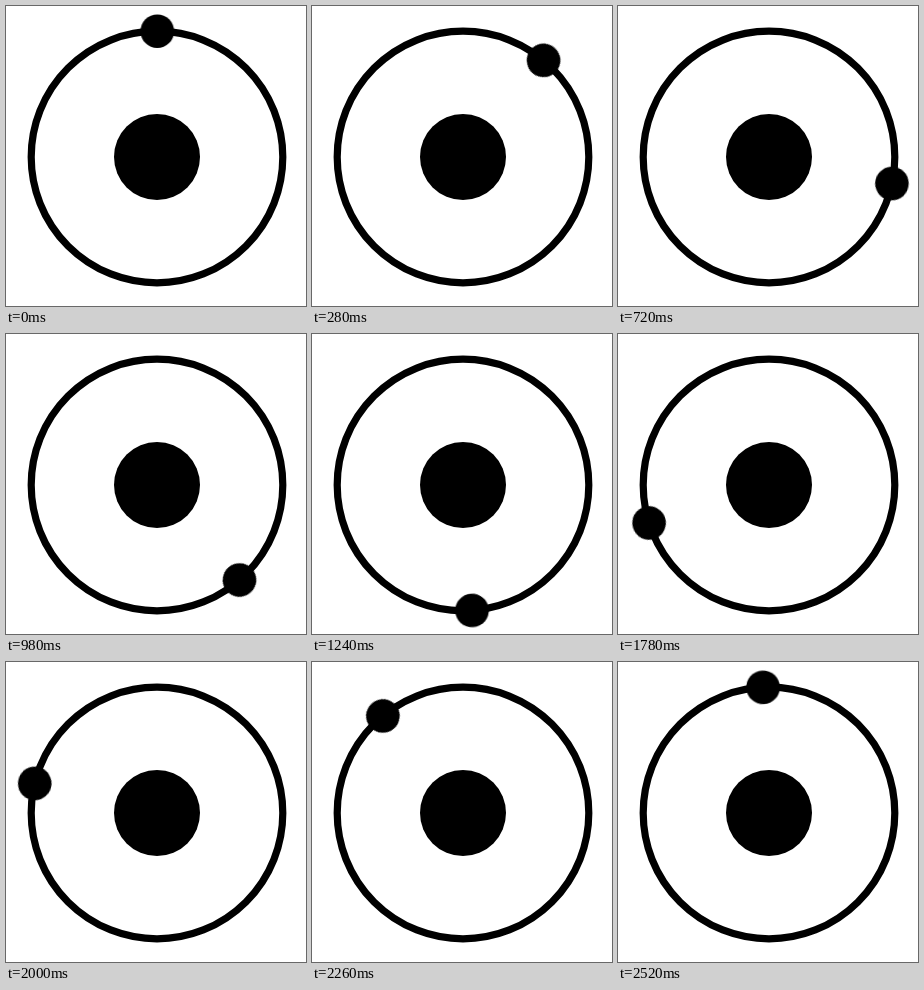
Recreate the animation shown at these times as an HTML page. Size 300 by 300 pixels, loop 2540 ms.

```html
<!DOCTYPE html>
<html lang="en">
<head>
<meta charset="utf-8">
<title>Orbit</title>
<style>
  html, body {
    margin: 0;
    width: 100%;
    height: 100%;
    overflow: hidden;
    background: #fff;
  }
  svg {
    display: block;
    width: 100%;
    height: 100%;
  }
  .ring {
    fill: none;
    stroke: #000;
    stroke-width: 7.2;
  }
  .moon {
    transform-origin: 151px 151px;
    animation: orbit 2540ms linear infinite;
  }
  @keyframes orbit {
    from { transform: rotate(0deg); }
    to { transform: rotate(360deg); }
  }
</style>
</head>
<body>
<svg viewBox="0 0 300 300">
  <circle class="ring" cx="151" cy="151" r="125.8"/>
  <circle cx="151" cy="151" r="43"/>
  <circle class="moon" cx="151" cy="25.2" r="16.8"/>
</svg>
</body>
</html>
```
